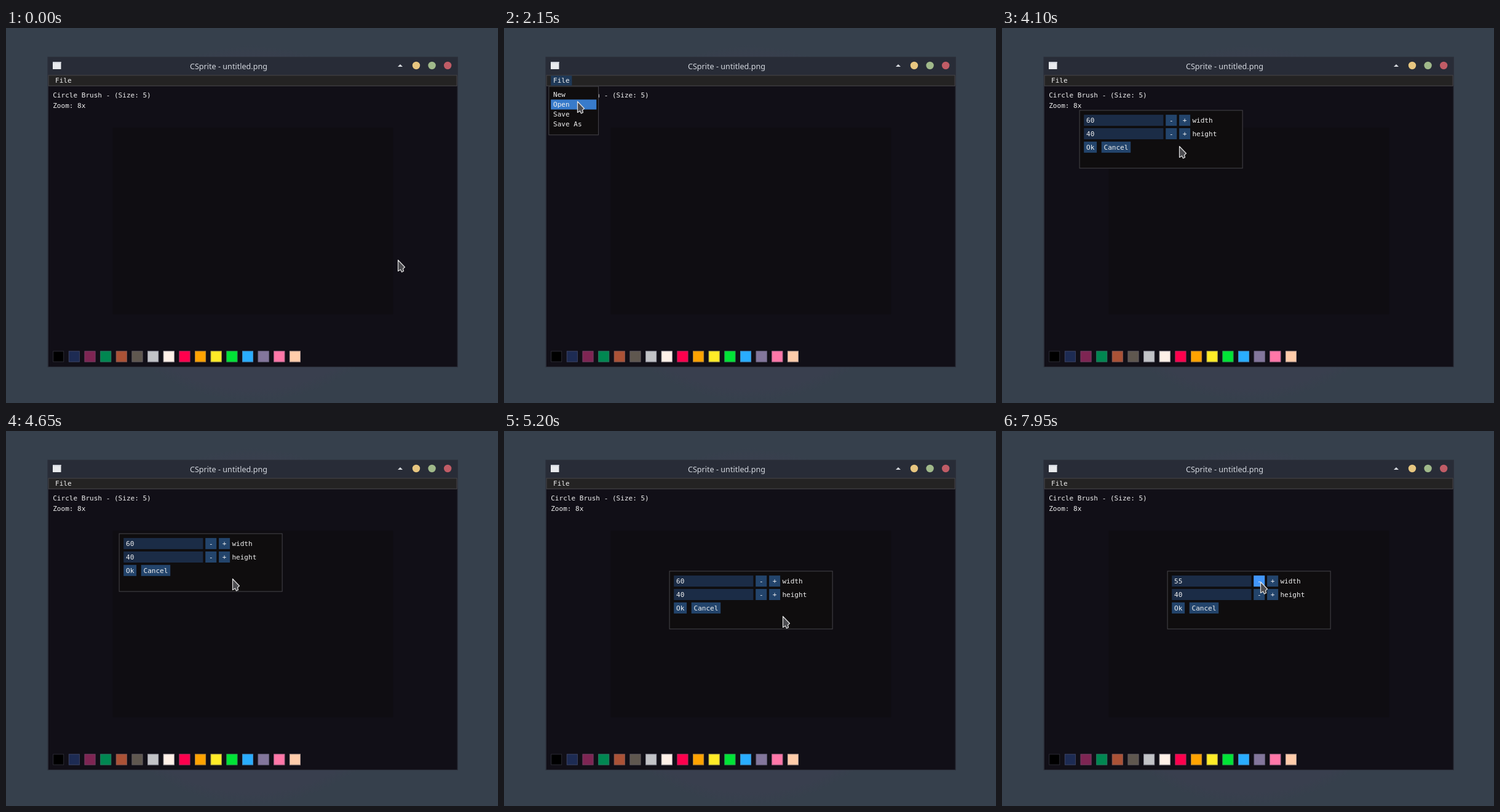
These frames come from a looping animation (800x610 px, 8000 ms). An HTML page with a canvas:

```html
<!DOCTYPE html>
<html lang="en">
<head>
<meta charset="utf-8">
<title>CSprite</title>
<style>
html, body { margin: 0; width: 100%; height: 100%; overflow: hidden; background: #36404c; }
canvas { display: block; }
</style>
</head>
<body>
<canvas id="stage" width="800" height="610"></canvas>
<script>
const ctx = document.getElementById('stage').getContext('2d');
const LOOP = 8000, STEP = 50;

// The interface is laid out in its own units, then scaled onto the stage.
const UI = { x: 68.6, y: 76.5, scale: .95 };
const CHAR = 7, LINE = 17, ROW = 19, PAD = 8, GAP = 4;
const MONO = '11.63px "DejaVu Sans Mono", "Liberation Mono", monospace';
const SANS = '12.6px "Noto Sans", "Open Sans", sans-serif';
const EDGE = '#4a494f', PANEL = '#0f0d0e', FIELD = '#1b2c46', BUTTON = '#23446b';
const HOVER = '#4296fa', HOVER_ITEM = '#387bcb', OPEN_ITEM = '#1f3958', SELECTED = '#2b517f', TEXT = '#f0f0f0';
const PALETTE = ('000000 1d2b53 7e2553 008751 ab5236 5f574f c2c3c7 fff1e8 ' +
  'ff004d ffa300 ffec27 00e436 29adff 83769c ff77a8 ffccaa').split(' ');
const MENU = ['New', 'Open', 'Save', 'Save As'];

const MENU_OPEN = 1400, DIALOG_OPEN = 2650, DRAG_START = 4400, DRAG_END = 5150;
const FOCUS = 6050, PRESS = 7450, REPEAT = 7750, REPEAT_EVERY = 66;

const MOVES = [
  { from: 0, to: 1200, x: 108, y: 96 },
  { from: 1250, to: 1400, x: 100, y: 87 },
  { from: 1650, to: 1900, x: 122, y: 122 },
  { from: 2050, to: 2450, x: 101, y: 102 },
  { from: 3100, to: 4100, x: 288, y: 192 },
  { from: 4100, to: DRAG_START, x: 310, y: 207 },
  { from: DRAG_START, to: 4850, x: 409, y: 263 },
  { from: 4850, to: DRAG_END, x: 453, y: 301 },
  { from: 5200, to: 6000, x: 283, y: 244 },
  { from: FOCUS, to: 6400, x: 406, y: 244 },
  { from: 6900, to: 7300, x: 420, y: 245 }
];

const clamp = v => Math.min(1, Math.max(0, v));
const ease = k => k * k * (3 - 2 * k);

function pointer(t) {
  let x = 637, y = 377;
  for (const m of MOVES) {
    const k = ease(clamp((t - m.from) / (m.to - m.from)));
    x += (m.x - x) * k;
    y += (m.y - y) * k;
  }
  return { x: Math.round(x), y: Math.round(y) };
}

const toUi = p => ({ x: (p.x - UI.x) / UI.scale, y: (p.y - UI.y) / UI.scale });
const inside = (p, x, y, w, h) => p.x >= x && p.x < x + w && p.y >= y && p.y < y + h;

function box(x, y, w, h, color) {
  ctx.fillStyle = color;
  ctx.fillRect(x, y, w, h);
}

function panel(x, y, w, h, fill, edge = EDGE) {
  box(x, y, w, h, fill);
  ctx.strokeStyle = edge;
  ctx.lineWidth = 1;
  ctx.strokeRect(x + .5, y + .5, w - 1, h - 1);
}

function text(str, x, baseline, font, color) {
  ctx.font = font;
  ctx.fillStyle = color;
  ctx.fillText(str, x, baseline);
}

const label = (str, x, top) => text(str, x, top + 10.4, MONO, TEXT);

function disc(x, y, r, color) {
  ctx.fillStyle = color;
  ctx.beginPath();
  ctx.arc(x, y, r, 0, Math.PI * 2);
  ctx.fill();
}

function polygon(points, color) {
  ctx.fillStyle = color;
  ctx.beginPath();
  points.forEach(([x, y]) => ctx.lineTo(x, y));
  ctx.closePath();
  ctx.fill();
}

function desktop() {
  box(0, 0, 800, 610, '#36404c');
  const glow = ctx.createRadialGradient(401, 318, 270, 401, 318, 290);
  glow.addColorStop(0, '#393f4e');
  glow.addColorStop(1, '#393f4e00');
  box(0, 0, 800, 610, glow);
}

function appWindow() {
  box(67.4, 46.8, 667.6, 505, '#2c303b');
  box(68.4, 47.5, 665.6, 29, '#282c37');
  box(69, 94, 664.6, 456.8, '#110f17');
  box(173.5, 162, 456, 304, '#0f0d12');
  box(76, 55, 13.5, 12, '#e8eaed');
  box(76, 55, 13.5, 2, '#cfd3da');
  text('CSprite - untitled.png', 299, 66.5, SANS, '#d3d7de');
  polygon([[637, 63], [641, 59], [645, 63]], '#d8dbe0');
  ['#e7c680', '#a0b98a', '#c05c66'].forEach((color, i) => disc(667 + i * 25.6, 61, 6.2, color));
}

function toolInfo() {
  label('Circle Brush - (Size: 5)', PAD, 28.5);
  label('Zoom: 8x', PAD, 28.5 + LINE);
  PALETTE.forEach((color, i) => {
    panel(PAD + i * (ROW + PAD), 472.5, ROW, ROW, '#' + color, 'rgba(96,94,116,.5)');
  });
}

function menu(t, mouse) {
  const open = t >= MENU_OPEN && t < DIALOG_OPEN;
  const hot = t < DIALOG_OPEN && inside(mouse, PAD, 0, 36, ROW);
  panel(0, 0, 700, ROW, '#242323');
  if (hot || open) box(PAD, 1, 36, ROW - 2, hot ? HOVER_ITEM : OPEN_ITEM);
  label('File', 12, 3);
  if (!open) return;
  panel(GAP, ROW, 86, PAD * 2 + LINE * MENU.length, PANEL);
  MENU.forEach((name, i) => {
    const top = ROW + PAD + LINE * i;
    if (inside(mouse, PAD, top - 2, 78, LINE)) box(PAD, top - 2, 78, LINE, HOVER_ITEM);
    label(name, 12, top);
  });
}

function dialogPos(t) {
  const grip = pointer(DRAG_START);
  const p = pointer(Math.min(DRAG_END, Math.max(DRAG_START, t)));
  return { x: 60 + (p.x - grip.x) / UI.scale, y: 60 + (p.y - grip.y) / UI.scale };
}

function widthValue(t) {
  if (t < PRESS) return 60;
  return t < REPEAT ? 59 : 58 - Math.floor((t - REPEAT) / REPEAT_EVERY);
}

function button(str, x, y, w, mouse) {
  box(x, y, w, ROW, inside(mouse, x, y, w, ROW) ? HOVER : BUTTON);
  label(str, x + (w - str.length * CHAR) / 2, y + 3);
}

function selection(x, y, mouse) {
  const w = CHAR * Math.min(2, Math.max(0, Math.round((mouse.x - x) / CHAR)));
  box(x, y, w, 13, SELECTED);
  box(x + w, y, 1, 13, TEXT);
}

// Drawn with its top left corner at the origin; the mouse is relative to it.
function dialog(t, mouse) {
  const field = 136, minus = PAD + field + GAP, plus = minus + ROW + GAP;
  panel(0, 0, 280, 100, PANEL);
  [[widthValue(t), 'width'], [40, 'height']].forEach(([value, name], i) => {
    const top = PAD + i * (ROW + GAP);
    box(PAD, top, field, ROW, FIELD);
    if (i === 0 && t >= FOCUS && t < PRESS) selection(PAD + GAP, top + 3, mouse);
    label(String(value), PAD + GAP, top + 3);
    button('-', minus, top, ROW, mouse);
    button('+', plus, top, ROW, mouse);
    label(name, plus + ROW + GAP - .5, top + 3);
  });
  const bottom = PAD + 2 * (ROW + GAP);
  button('Ok', PAD, bottom, 22, mouse);
  button('Cancel', PAD + 30, bottom, 50, mouse);
  return [0, 1].some(i => inside(mouse, PAD, PAD + i * (ROW + GAP), field + 2, ROW));
}

function arrow() {
  polygon([[0, 0], [0, 18], [4, 15.5], [6, 19.5], [9, 18], [8, 14], [11, 11.5]], '#4c4c50');
  ctx.strokeStyle = '#dedede';
  ctx.lineWidth = 1.2;
  ctx.lineJoin = 'round';
  ctx.stroke();
}

function beam() {
  for (const [grow, color] of [[1, '#303238'], [0, '#ececec']]) {
    for (const [x, y, w, h] of [[-3, -8, 7, 2], [-1, -8, 2, 16], [-3, 6, 7, 2]]) {
      box(x - grow, y - grow, w + 2 * grow, h + 2 * grow, color);
    }
  }
}

function draw(now) {
  const t = Math.floor(now % LOOP / STEP) * STEP;
  const tip = pointer(t), mouse = toUi(tip);
  let overField = false;
  desktop();
  appWindow();

  ctx.save();
  ctx.translate(UI.x, UI.y);
  ctx.scale(UI.scale, UI.scale);
  toolInfo();
  menu(t, mouse);
  if (t >= DIALOG_OPEN) {
    const pos = dialogPos(t);
    ctx.translate(pos.x, pos.y);
    overField = dialog(t, { x: mouse.x - pos.x, y: mouse.y - pos.y });
  }
  ctx.restore();

  ctx.save();
  if (overField) {
    ctx.translate(tip.x, tip.y);
    beam();
  } else {
    ctx.translate(tip.x + .5, tip.y + .5);
    arrow();
  }
  ctx.restore();
}

const start = performance.now();
function tick() {
  draw(performance.now() - start);
  requestAnimationFrame(tick);
}
tick();
</script>
</body>
</html>
```
